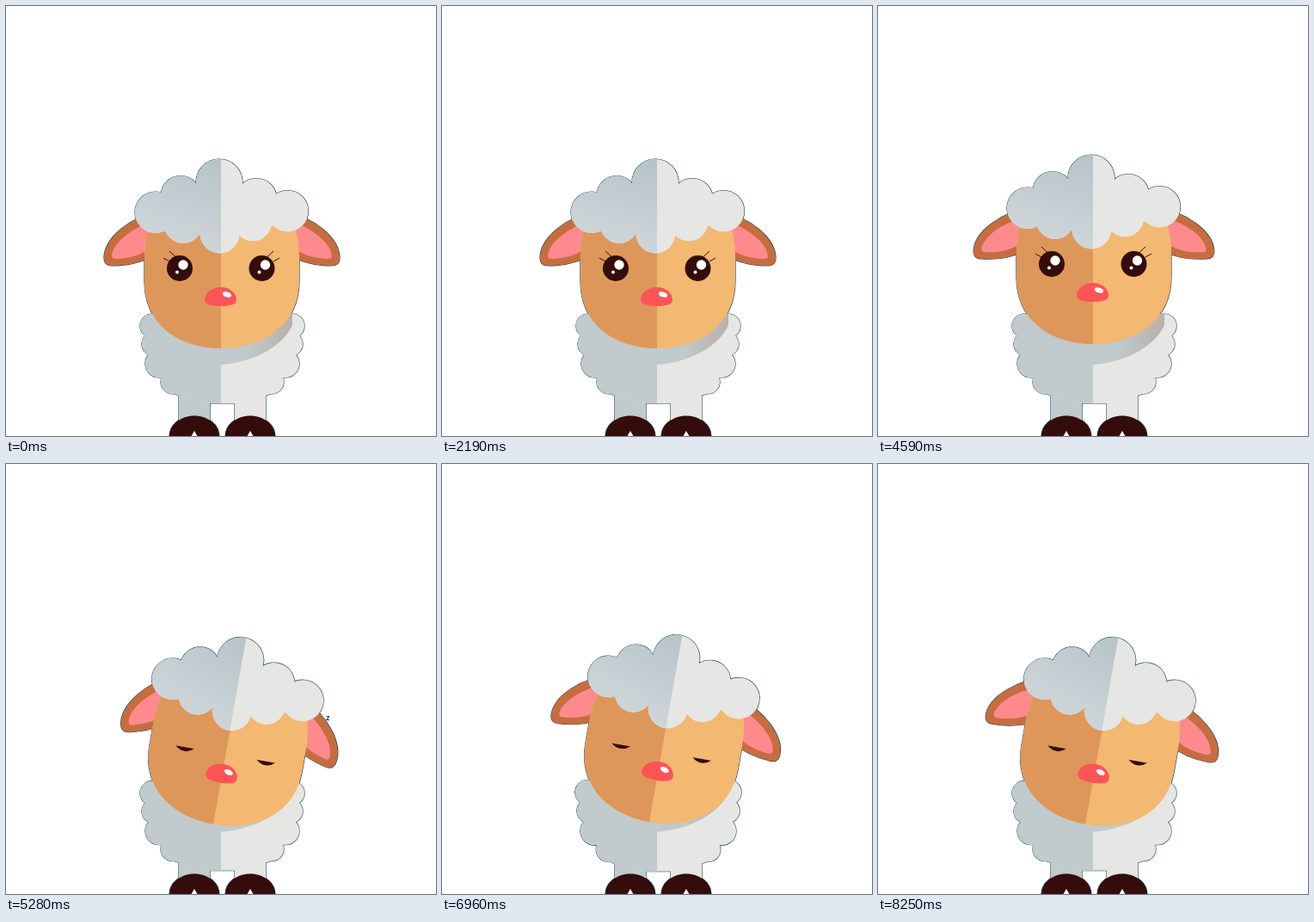
Recreate the animation shown at these times as an HTML page with a canvas. Size 500 px wide and 500 px high, loop 9000 ms.

```html
<!DOCTYPE html>
<html lang="en">
<head>
<meta charset="utf-8">
<title>Sleepy sheep</title>
<style>
  html, body { margin: 0; height: 100%; overflow: hidden; background: #fff; }
  canvas { display: block; width: 500px; height: 500px; }
</style>
</head>
<body>
<canvas id="stage" width="500" height="500"></canvas>
<script>
const ctx = document.getElementById('stage').getContext('2d');
const LOOP = 9000, STEP = 30;
const OUTLINE = '#174654', WOOL_DARK = '#c1cacc', WOOL_LIGHT = '#e6e6e4', DARK = '#340c0b';

function gradient(x0, y0, x1, y1, from, to) {
  const g = ctx.createLinearGradient(x0, y0, x1, y1);
  g.addColorStop(0, from);
  g.addColorStop(1, to);
  return g;
}

function circles(path, list) {
  for (const [x, y, r] of list) {
    path.moveTo(x + r, y);
    path.arc(x, y, r, 0, 7);
  }
  return path;
}

const hair = circles(new Path2D(), [
  [248, 205, 27], [203, 220.5, 23], [174, 240, 24], [206, 254, 22],
  [248.5, 264.5, 23], [287, 251.5, 22], [327.5, 238.5, 24], [291, 224.5, 24]
]);
hair.moveTo(330, 236);
hair.ellipse(250, 236, 80, 30, 0, 0, 7);

const curls = [[170, 372, 14], [172, 393, 14], [178, 416, 16], [194, 437, 14]];
const body = new Path2D('M170 360H333L310 450L302 453L268 462H236L201 453L194 450Z');
circles(body, curls);
circles(body, curls.map(([x, y, r]) => [503 - x, y, r]));

const face = new Path2D('M170 243C164 262 161 275 161 292V320C161 370 200 398 250 398S341 370 341 320V292C341 275 338 262 332 243Z');
const ear = new Path2D('M185 240H175C145 245 114 270 114 293C114 299 117 302 123 302C145 302 160 297 172 290H185Z');
const innerEar = new Path2D('M185 250H172C148 257 124 275 123 291C123 293 125 294 128 294C148 293 160 288 172 278H185Z');
const legs = new Path2D('M201 445H237V485H201ZM266 445H302V485H266Z');
const hooves = new Path2D('M190 501C190 487 203 476.5 219 476.5S248 487 248 501ZM255 501C255 487 268 476.5 284 476.5S313 487 313 501Z');
const notches = new Path2D('M219 494L223 501H215ZM284 494L288 501H280Z');
const shadow = new Path2D('M250 417C290 414 322 395 333 371V357L250 375Z');
const nose = new Path2D('M231 342C231 334 239 327 250 327S268 334 268 342C268 348 258 349 249.5 349S231 348 231 342Z');
const lashes = new Path2D('M190 285L197 291.5M183 293L190 297');

const hairShade = gradient(230, 180, 200, 275, '#b8c5c8', '#ced5d9');
const castShade = gradient(280, 0, 336, 0, '#c0c9cb', '#b9aea8');

// Keyframes are [time, value] pairs with eased motion between them.
function track(t, keys) {
  let [t0, v0] = keys[0];
  if (t <= t0) return v0;
  for (const [t1, v1] of keys) {
    if (t < t1) return v0 + (v1 - v0) * (1 - Math.cos(Math.PI * (t - t0) / (t1 - t0))) / 2;
    [t0, v0] = [t1, v1];
  }
  return v0;
}

function poseAt(t) {
  const sleep = track(t, [[4900, 0], [5250, 1]]);
  const breath = track(t, [[6200, 0], [7400, 1], [8250, 0]]);
  return {
    sleep, breath,
    sink: track(t, [[4850, 0], [5150, 10.7]]),
    lift: track(t, [[4080, 0], [4590, -5], [4950, 0]]) - 4 * breath,
    ears: track(t, [
      [330, 0], [750, 16], [1170, 0], [1530, 0], [1860, 16], [2190, 0],
      [4080, 0], [4590, 4], [4900, 0], [5250, -12], [6700, -11], [7300, 10], [7800, 0]
    ])
  };
}

function scoped(draw) {
  ctx.save();
  draw();
  ctx.restore();
}

function fill(path, color) {
  ctx.fillStyle = color;
  ctx.fill(path);
}

function dot(x, y, r, color) {
  fill(circles(new Path2D(), [[x, y, r]]), color);
}

function halves(path, left, right) {
  fill(path, right);
  scoped(() => {
    ctx.beginPath();
    ctx.rect(0, 0, 250, 600);
    ctx.clip();
    fill(path, left);
  });
}

function mirror(axis, draw) {
  scoped(draw);
  scoped(() => {
    ctx.translate(2 * axis, 0);
    ctx.scale(-1, 1);
    draw();
  });
}

function inBody(pose, draw) {
  scoped(() => {
    ctx.translate(251, 415 + pose.sink);
    ctx.scale(1 + 0.016 * pose.breath, 1 + 0.03 * pose.breath);
    ctx.translate(-251, -415);
    draw();
  });
}

function inHead(pose, draw) {
  scoped(() => {
    ctx.translate(250 + 10.2 * pose.sleep, 288 + 22.5 * pose.sleep + pose.lift);
    ctx.rotate(pose.sleep * Math.PI / 18);
    ctx.translate(-250, -288);
    draw();
  });
}

function inEars(pose, draw) {
  mirror(251, () => {
    ctx.translate(165, 250);
    ctx.rotate(pose.ears * Math.PI / 180);
    ctx.translate(-165, -250);
    draw();
  });
}

function drawOutlines(pose) {
  ctx.strokeStyle = OUTLINE;
  ctx.lineWidth = 1.2;
  ctx.stroke(legs);
  ctx.stroke(hooves);
  inBody(pose, () => ctx.stroke(body));
  inHead(pose, () => {
    inEars(pose, () => ctx.stroke(ear));
    ctx.stroke(face);
    ctx.stroke(hair);
  });
}

function drawEye(x, y, sleep) {
  scoped(() => {
    const lid = -15 + 26.5 * sleep;
    ctx.beginPath();
    ctx.rect(x - 16, y + lid - 1, 32, 32 - lid);
    ctx.clip();
    dot(x, y, 15, DARK);
    dot(x + 4, y - 4, 5.7, '#fff');
    dot(x - 3, y + 4.5, 2, '#fff');
  });
}

function drawHead(pose) {
  inEars(pose, () => {
    fill(ear, '#c66d40');
    fill(innerEar, '#ff8a8e');
  });
  halves(face, '#de975a', '#f3b871');
  drawEye(202, 305, pose.sleep);
  drawEye(297.5, 305, pose.sleep);
  if (pose.sleep < 0.4) {
    ctx.strokeStyle = DARK;
    ctx.lineWidth = 1;
    mirror(250.5, () => ctx.stroke(lashes));
  }
  fill(nose, '#fc5558');
  ctx.beginPath();
  ctx.ellipse(257, 335.5, 5.3, 3, 0.3, 0, 7);
  ctx.fillStyle = '#fff';
  ctx.fill();
  halves(hair, hairShade, WOOL_LIGHT);
}

function drawSnores(t) {
  ctx.fillStyle = OUTLINE;
  ctx.textAlign = 'center';
  ctx.textBaseline = 'middle';
  for (const start of [5250, 7500]) {
    for (let i = 0; i < 3; i++) {
      const u = (t - start - 90 * i) / 450;
      if (u <= 0 || u >= 1) continue;
      ctx.font = `bold ${8 + 18 * u}px "Open Sans", sans-serif`;
      ctx.fillText('z', 371.5 + 41 * u, 304 - 123 * u);
    }
  }
}

function render(t) {
  const pose = poseAt(t);
  ctx.fillStyle = '#fff';
  ctx.fillRect(0, 0, 500, 500);
  drawOutlines(pose);
  halves(legs, WOOL_DARK, WOOL_LIGHT);
  fill(hooves, DARK);
  fill(notches, '#fff');
  inBody(pose, () => {
    halves(body, WOOL_DARK, WOOL_LIGHT);
    fill(shadow, castShade);
  });
  inHead(pose, () => drawHead(pose));
  drawSnores(t);
}

const begin = performance.now();
function tick() {
  const t = (performance.now() - begin) % LOOP;
  render(Math.floor(t / STEP) * STEP);
  requestAnimationFrame(tick);
}
tick();
</script>
</body>
</html>
```
